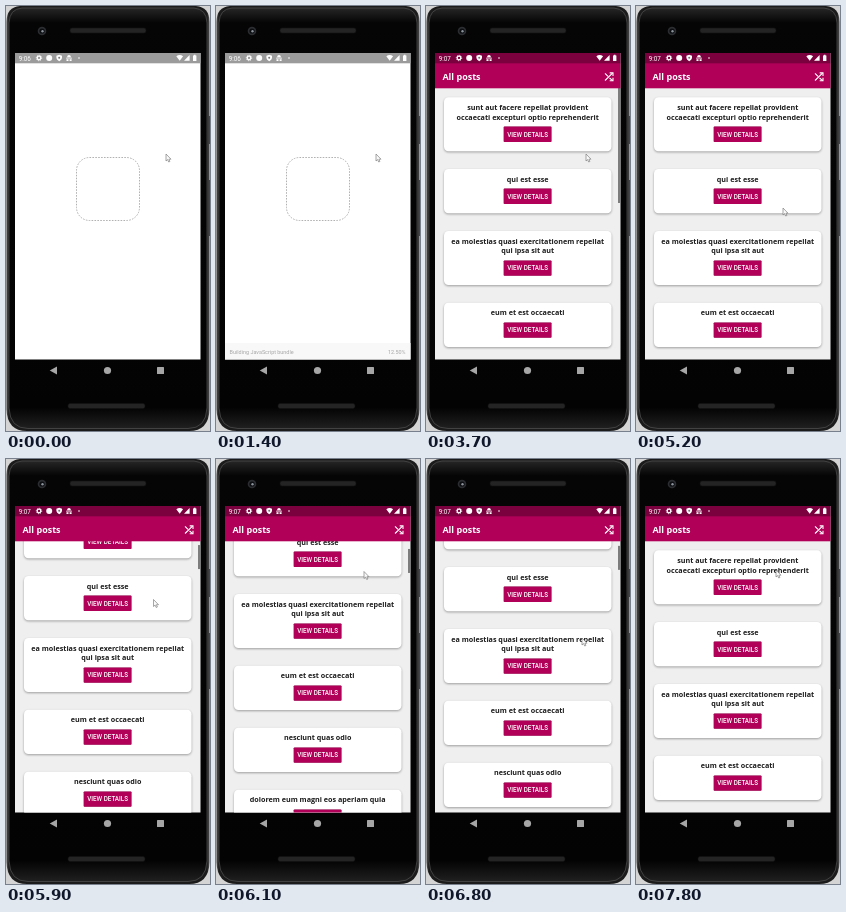
These frames come from a looping animation (204 by 425 pixels, 8000 ms). An HTML page:

```html
<!DOCTYPE html>
<html lang="en">
<head>
<meta charset="utf-8">
<title>Post list on a phone</title>
<style>
html, body { margin: 0; width: 100%; height: 100%; overflow: hidden; background: #d4d4d4; }
svg { display: block; width: 204px; height: 425px; }
text { font-family: Roboto, sans-serif; }
.title, .head { font-family: "Open Sans", sans-serif; font-weight: 700; }
.title { font-size: 7.2px; fill: #1c1c1c; text-anchor: middle; }
.head { font-size: 9px; fill: #fff; }
.label { font-size: 6.3px; font-weight: 500; fill: #fff; text-anchor: middle; }
.note { font-size: 5.45px; fill: #a6a6a6; }
.card { filter: drop-shadow(0 1px 1.1px rgba(0, 0, 0, .34)); }
.button { filter: drop-shadow(0 .7px .7px rgba(0, 0, 0, .38)); }
</style>
</head>
<body>
<svg viewBox="0 0 204 425" xmlns="http://www.w3.org/2000/svg">
  <defs>
    <linearGradient id="rim" x2="1" y2="0">
      <stop offset="0" stop-color="#555"/><stop offset=".012" stop-color="#1b1b1b"/>
      <stop offset=".988" stop-color="#1b1b1b"/><stop offset="1" stop-color="#555"/>
    </linearGradient>
    <linearGradient id="face" x2="0" y2="1">
      <stop offset="0" stop-color="#262626"/><stop offset=".035" stop-color="#050505"/>
      <stop offset=".95" stop-color="#030303"/><stop offset="1" stop-color="#202020"/>
    </linearGradient>
    <clipPath id="view"><rect x="9" y="82" width="185.5" height="271.5"/></clipPath>
  </defs>

  <g id="phone">
    <path d="M202.4 110h1.6v28h-1.6zM202.4 174h1.6v56h-1.6z" fill="#333"/>
    <path d="M14 0H190Q203.5 1 203.5 16V403Q203 425 183 425H21Q1 425 .5 403V16Q.5 1 14 0Z" fill="url(#rim)"/>
    <path d="M16 2H188Q200.500 3 201 17V402Q200 422.500 182 422.500H22Q4 422.500 3 402V17Q3.500 3 16 2Z" fill="url(#face)" stroke="#4c4c4c" stroke-width=".8"/>
    <rect x="64" y="22" width="76" height="5" rx="2" fill="#242424" stroke="#111" stroke-width=".6"/>
    <rect x="62" y="397.500" width="77" height="5" rx="2" fill="#242424" stroke="#111" stroke-width=".6"/>
    <circle cx="36" cy="25" r="4.300" fill="#2b2d30"/>
    <circle cx="36" cy="25" r="2.600" fill="#0b0d10"/>
    <circle cx="36.500" cy="25.300" r="1.200" fill="#8b939b"/>
    <g fill="#a6a6a6">
      <path d="M51 360.500v8l-7.300-4z"/>
      <circle cx="101.500" cy="364.500" r="3.600"/>
      <rect x="151" y="361" width="7" height="7" rx=".5"/>
    </g>
  </g>

  <rect id="page" x="9" y="47" width="185.500" height="306.500"/>

  <g id="splash">
    <rect x="70.500" y="151.500" width="63" height="63" rx="13" fill="none" stroke="#a9a9a9" stroke-width=".9" stroke-dasharray="1.6 1.3"/>
    <g id="bar">
      <rect x="9" y="337" width="185.500" height="16.500" fill="#f8f8f8"/>
      <text id="task" class="note" x="13.600" y="348"/>
      <text id="percent" class="note" x="189.600" y="348" text-anchor="end"/>
    </g>
  </g>

  <g id="app">
    <g clip-path="url(#view)">
      <g id="list"></g>
      <rect id="thumb" x="192" width="2" fill="#7d7d7d"/>
    </g>
    <rect x="9" y="57" width="185.500" height="25.300" fill="#b00058"/>
    <text class="head" x="16.400" y="73.600">All posts</text>
    <g fill="none" stroke="#fff" stroke-width="1.100">
      <path d="M179 67.300L182 70.300M183.500 71.800L186.500 74.500M179 74.500L186.500 67.200"/>
      <path d="M183.700 66.900H187V70M183.700 74.800H187V71.700"/>
    </g>
  </g>

  <rect id="status" x="9" y="47" width="185.500" height="10.300"/>
  <g id="icons" fill="#fff">
    <text id="clock" x="12.700" y="54.700" font-size="6.300"/>
    <circle cx="33" cy="52" r="1.800" fill="none" stroke="#fff" stroke-width="1.300"/>
    <circle cx="33" cy="52" r="2.700" fill="none" stroke="#fff" stroke-width=".9" stroke-dasharray="1.1 1.020"/>
    <circle cx="43.200" cy="52" r="3"/>
    <path d="M53.200 48.800l2.800 1v2.200q-.2 2.100-2.800 3.200q-2.600-1.100-2.800-3.200v-2.200z"/>
    <circle cx="53.200" cy="51.800" r="1" fill="#777"/>
    <path d="M61 51.300q.3-2.300 2-2.300t2 2.300zM60 51.800h6v.8h-6z"/>
    <path d="M60.500 53.300h2v1.700h-2zM63.600 53.300h2v1.700h-2z"/>
    <circle cx="73" cy="52" r=".8"/>
    <path d="M170.300 50.300q3.400-2.500 6.800 0l-3.400 4.500z"/>
    <path d="M183.600 49v5.800h-5.600z"/>
    <path d="M187 49.600h.9v-.8h1.600v.8h.9v5.300h-3.400z"/>
  </g>

  <path id="cursor" d="M0 0V7L1.600 5.600L2.700 8L3.900 7.500L2.900 5.200H5Z" fill="#fafafa" stroke="#777" stroke-width=".65" stroke-linejoin="round"/>
</svg>

<script>
const LOOP = 8000, STEP = 100;
const VIEW_TOP = 82, VIEW_H = 271.5;
const $ = id => document.getElementById(id);

const posts = [
  ["sunt aut facere repellat provident", "occaecati excepturi optio reprehenderit"],
  ["qui est esse"],
  ["ea molestias quasi exercitationem repellat", "qui ipsa sit aut"],
  ["eum et est occaecati"],
  ["nesciunt quas odio"],
  ["dolorem eum magni eos aperiam quia"]
];

// [time, x, y]
const cursorPath = [
  [4000, 160, 148], [4300, 150, 102], [4500, 131, 68], [4600, 119, 82],
  [4900, 130, 173], [5000, 136, 188], [5200, 147, 202], [5500, 147, 202],
  [5900, 147.5, 140.5], [6100, 148, 112.5], [6300, 150, 106], [6500, 151, 116],
  [6800, 156, 179], [6950, 160, 203], [7100, 161, 195], [7400, 157, 141],
  [7600, 127, 120], [7800, 140, 111]
];

// [time, offset]
const scrollPath = [
  [5500, 0], [5600, 4], [5900, 46], [6100, 90], [6200, 104], [6300, 113],
  [6400, 118], [6500, 118], [6800, 55], [7000, 15], [7100, 4], [7200, 0]
];

// [time, opacity]
const thumbFade = [
  [4900, 1], [5200, 0], [5500, 0], [5600, 1], [7400, 1], [7700, 0]
];

// The thumb shrinks as further batches of rows are laid out.
const thumbSizes = [[3700, 115], [3900, 54], [4100, 38], [4300, 29], [4500, 24]];

const tasks = [
  [1400, "Building", 12.5], [1500, "Building", 37.5], [1600, "Building", 62.5],
  [1700, "Building", 83.33], [1900, "Downloading", 94.2],
  [2000, "Downloading", 99.68], [2200, "Downloading", 100]
];

function tween(keys, t, col = 1) {
  const i = keys.findIndex(k => k[0] > t);
  if (i === 0) return keys[0][col];
  if (i < 0) return keys[keys.length - 1][col];
  const a = keys[i - 1], b = keys[i];
  return a[col] + (b[col] - a[col]) * (t - a[0]) / (b[0] - a[0]);
}

function latest(keys, t) {
  return keys.filter(k => k[0] <= t).pop() || keys[0];
}

function buildList() {
  let y = 91.2, out = "";
  for (const lines of posts) {
    const h = 34.4 + 9.8 * lines.length;
    const top = y + h - 24.6;
    out += `<rect class="card" x="18" y="${y}" width="167.500" height="${h}" rx="4.500" fill="#fff"/>`;
    lines.forEach((s, i) => {
      out += `<text class="title" x="101.700" y="${y + 12.6 + 9.8 * i}">${s}</text>`;
    });
    out += `<rect class="button" x="77.700" y="${top}" width="47.800" height="15.400" rx=".8" fill="#b00058"/>` +
      `<text class="label" x="101.600" y="${top + 10}">VIEW DETAILS</text>`;
    y += h + 17.8;
  }
  $("list").innerHTML = out;
}

const set = (id, name, value) => $(id).setAttribute(name, value);
const show = (id, on) => set(id, "display", on ? "inline" : "none");

function draw(ms) {
  const t = Math.floor(ms / STEP) * STEP;
  const open = t >= 3300, loaded = t >= 3700;

  set("page", "fill", open ? "#efefef" : "#fff");
  set("status", "fill", open ? "#7b003e" : "#9b9b9b");
  $("clock").textContent = t < 2700 ? "9:06" : "9:07";
  show("splash", !open);
  show("app", open);
  show("bar", t >= 1400);
  show("list", loaded);
  show("thumb", loaded);

  const [, verb, done] = latest(tasks, t);
  $("task").textContent = verb + " JavaScript bundle";
  $("percent").textContent = done.toFixed(2) + "%";

  const scroll = tween(scrollPath, t);
  const size = latest(thumbSizes, t)[1];
  set("list", "transform", `translate(0 ${-scroll})`);
  set("thumb", "y", VIEW_TOP + scroll * size / VIEW_H);
  set("thumb", "height", size);
  set("thumb", "opacity", tween(thumbFade, t));

  set("cursor", "transform", `translate(${tween(cursorPath, t)} ${tween(cursorPath, t, 2)})`);
}

buildList();
draw(0);
const start = performance.now();
function tick() {
  draw((performance.now() - start) % LOOP);
  requestAnimationFrame(tick);
}
requestAnimationFrame(tick);
</script>
</body>
</html>
```
